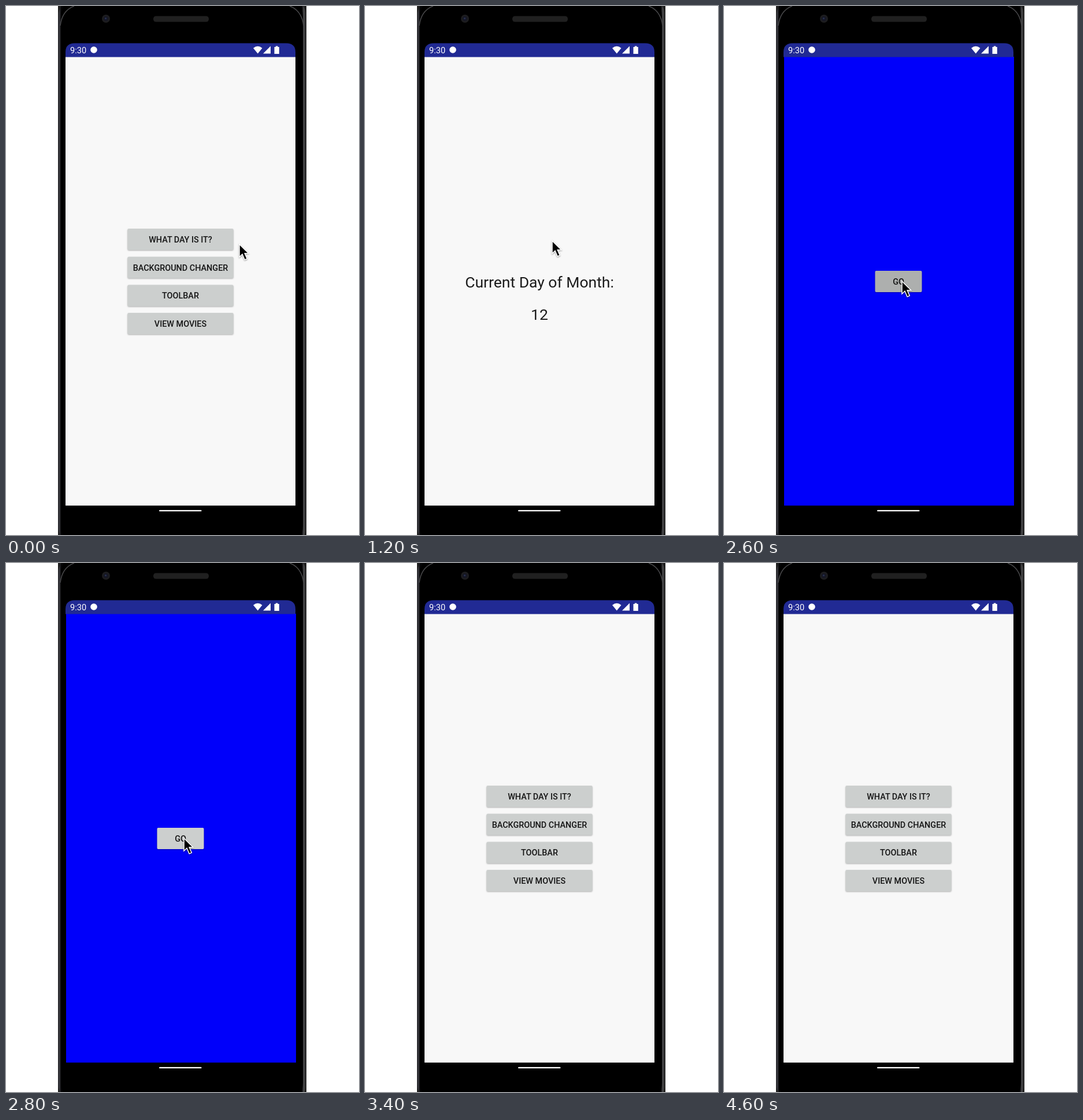
Write an HTML page that moves like this. It is 611x917 px and loops after 4.8 s.

```html
<!DOCTYPE html>
<html lang="en">
<head>
<meta charset="utf-8">
<title>Phone demo</title>
<style>
  html, body { margin: 0; width: 100%; height: 100%; overflow: hidden; background: #fff; }
  svg { display: block; width: 611px; height: 917px; font-family: Roboto, Arial, sans-serif; }
  .button rect { fill: #cccfce; filter: drop-shadow(0 1px 1px rgba(0, 0, 0, .3)); }
  .button text { font-size: 14.4px; font-weight: 500; fill: #141414; text-anchor: middle; }
  .button.pressed rect { fill: #adafae; }
  #day text { font-size: 26.5px; fill: #1b1b1b; text-anchor: middle; }
</style>
</head>
<body>
<svg viewBox="0 0 611 917">
  <defs>
    <linearGradient id="rim">
      <stop offset="0" stop-color="#1c1c20"/>
      <stop offset=".006" stop-color="#3c3c42"/>
      <stop offset=".012" stop-color="#050506"/>
      <stop offset=".982" stop-color="#050506"/>
      <stop offset=".989" stop-color="#4a4a4c"/>
      <stop offset="1" stop-color="#1a1a1a"/>
    </linearGradient>
  </defs>

  <rect x="90" width="430" height="917" fill="#1e1e1e"/>
  <rect x="90" y="-18" width="430" height="957" rx="38" fill="url(#rim)"/>
  <rect x="95" y="-16" width="419" height="952" rx="34"/>
  <path d="M94 34Q97 8 118 0M515 34Q512 8 491 0" fill="none" stroke="#48484a" stroke-width="1.5"/>
  <circle cx="173" cy="22" r="7" fill="#1d1d1f"/>
  <circle cx="173" cy="22" r="4" fill="#151724"/>
  <circle cx="172.5" cy="21.5" r="1.6" fill="#283050"/>
  <rect x="255" y="17.5" width="96" height="10" rx="4.5" fill="#202020"/>

  <rect id="page" y="88" width="398" height="778"/>
  <path d="M103 88.5V80Q103 64.5 119 64.5H485Q501 64.5 501 80V88.5Z" fill="#212a94"/>
  <g fill="#fff">
    <text x="111" y="82" font-size="14.6">9:30</text>
    <circle cx="152" cy="76" r="5.8"/>
    <path d="M428 73Q435.8 66.5 443.5 73L435.8 82.5Z"/>
    <path d="M458 69.5V82.5H445Z"/>
    <path d="M464.5 71H466.8V69.5H470.5V71H472.8V83H464.5Z"/>
    <rect x="265" y="873.7" width="73.5" height="2.3" rx="1.1"/>
  </g>

  <g id="menu"></g>
  <g id="day">
    <text x="302" y="487.5">Current Day of Month:</text>
    <text x="302" y="543.5">12</text>
  </g>
  <g id="changer"></g>
  <g id="bar">
    <rect x="103" y="88.5" width="398" height="56.5" fill="#2938ac"/>
    <text x="119" y="125" font-size="20.4" font-weight="500" fill="#fff">PracticingWorkshops</text>
  </g>

  <path id="cursor" d="M0 0V22L5 17.3L9.2 27L13.3 25.2L9.2 15.8H15.8Z"
    stroke="#fff" stroke-width="1.5" style="filter:drop-shadow(0 1px 1px rgba(0,0,0,.4))"/>
</svg>
<script>
const STEP = 200, LOOP = 4800;
const $ = id => document.getElementById(id);
const views = ['menu', 'day', 'changer', 'bar'];

// [first step, view, page colour, page left]
const PAPER = ['#f8f8f8', 103], BLUE = ['#0000fa', 104];
const scenes = [
  [0, 'menu', ...PAPER], [3, 'day', ...PAPER], [9, 'menu', ...PAPER],
  [11, 'changer', ...PAPER], [13, 'changer', ...BLUE], [17, 'menu', ...PAPER],
  [19, 'bar', ...PAPER], [21, 'menu', ...PAPER]
];

// [first step, x, y]; without a position the pointer is hidden
const pointer = [
  [0, 404, 413], [1, 366, 409], [2, 324, 407], [7, 337, 456],
  [12, 308, 477], [15, 312, 494], [16], [18, 296, 505], [19],
  [22, 278, 520], [23]
];

const button = (label, y, width) => `<g class="button">
  <rect x="${302 - width / 2}" y="${y}" width="${width}" height="37" rx="2"/>
  <text x="302" y="${y + 24}">${label}</text></g>`;

$('menu').innerHTML = ['WHAT DAY IS IT?', 'BACKGROUND CHANGER', 'TOOLBAR', 'VIEW MOVIES']
  .map((label, i) => button(label, 386 + i * 48.7, 183)).join('');
$('changer').innerHTML = button('GO', 459, 81);

const current = (list, step) => list.findLast(entry => entry[0] <= step);

function draw(now) {
  const step = Math.floor(now % LOOP / STEP);
  const [, view, colour, left] = current(scenes, step);
  const [, x, y] = current(pointer, step);
  for (const id of views) $(id).style.display = id === view ? '' : 'none';
  $('page').setAttribute('fill', colour);
  $('page').setAttribute('x', left);
  $('changer').firstChild.classList.toggle('pressed', step === 13);
  $('cursor').style.display = x === undefined ? 'none' : '';
  if (x !== undefined) $('cursor').setAttribute('transform', `translate(${x} ${y})`);
}

const start = performance.now();
function tick() {
  draw(performance.now() - start);
  requestAnimationFrame(tick);
}
tick();
</script>
</body>
</html>
```
